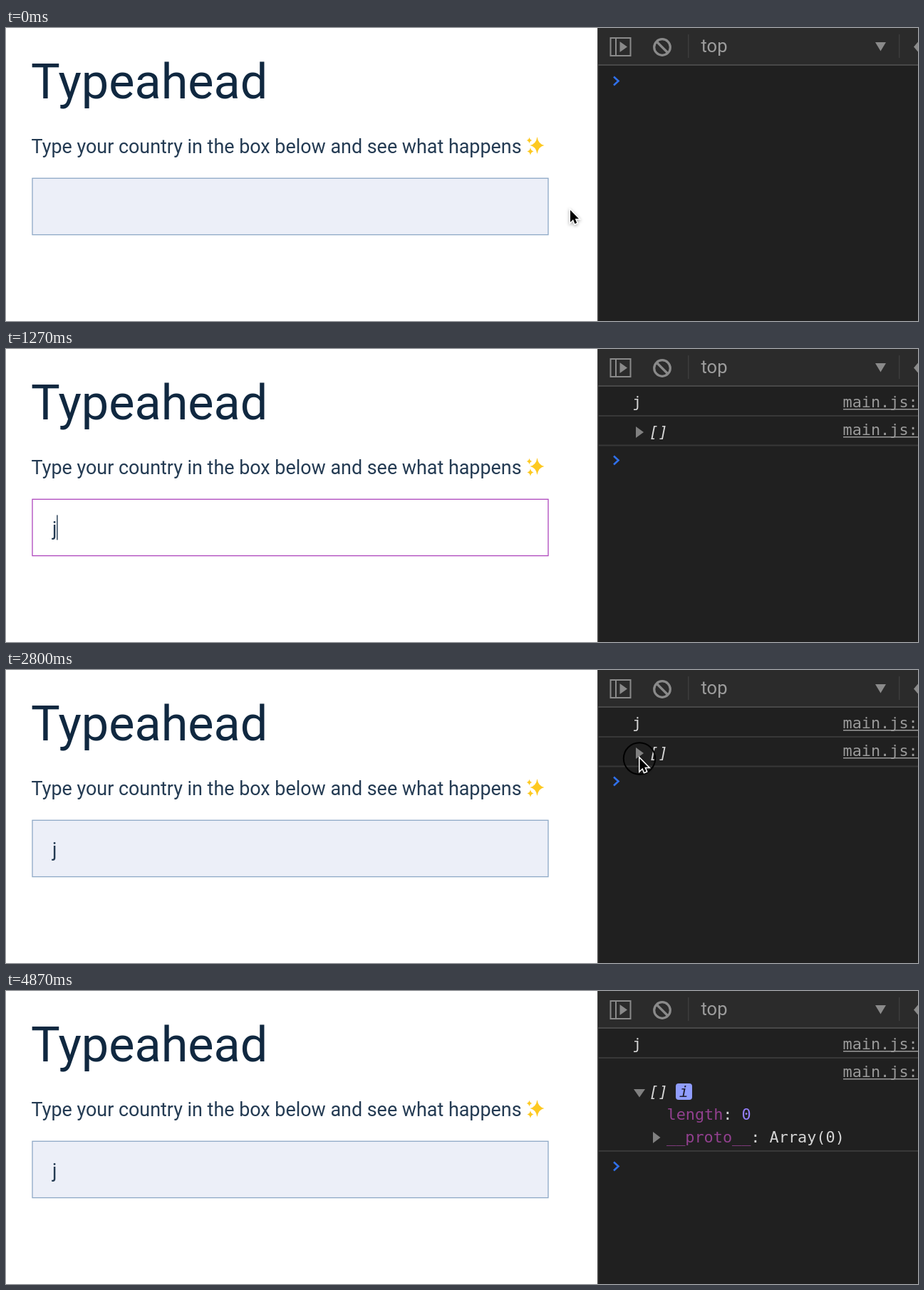
An HTML page with a canvas that plays this animation: 1280 by 412 pixels, repeating every 5070 ms.

```html
<!DOCTYPE html>
<html lang="en">
<head>
<meta charset="utf-8">
<title>Typeahead</title>
<style>
  html, body { margin: 0; width: 100%; height: 100%; overflow: hidden; background: #fff; }
  canvas { display: block; width: 1280px; height: 412px; }
</style>
</head>
<body>
<canvas id="stage" width="1280" height="412"></canvas>
<script>
const ctx = document.getElementById('stage').getContext('2d');
const LOOP = 5070;
const SANS = 'Roboto, sans-serif';
const MONO = '21.85px "DejaVu Sans Mono", monospace';
const INK = '#243b53', GREY = '#8a8a8a', PALE = '#d5d5d5', PURPLE = '#92408f';

const FOCUS = 670, TYPED = 1200, LOGGED = 1270, BLUR = 2800, EXPANDED = 2870;
const CARET_ON = [[FOCUS, 1730], [2270, 2730]];
const RING_ON = [[FOCUS, 730], [BLUR, 2930]];

// Pointer poses, each held until the next: time, shape, x, y
const POINTER = [
  [0, 'arrow', 792, 256],
  [270, 'arrow', 786, 255],
  [330, 'beam', 745, 252],
  [400, 'beam', 719, 251],
  [470, 'beam', 713, 251],
  [TYPED, 'none'],
  [2200, 'beam', 718, 249],
  [2270, 'beam', 742, 235],
  [2330, 'arrow', 802, 196],
  [2400, 'arrow', 868, 152],
  [2470, 'arrow', 905, 130],
  [2530, 'arrow', 912, 124],
  [2600, 'arrow', 897, 124],
  [2670, 'arrow', 889.5, 124.5],
  [4270, 'arrow', 864, 122],
  [4330, 'arrow', 960, 120],
  [4400, 'arrow', 1087, 127],
  [4470, 'arrow', 1185, 136],
  [4530, 'arrow', 1242, 149],
  [4600, 'arrow', 1270, 164],
  [4670, 'none']
];

const within = (t, spans) => spans.some(([from, to]) => t >= from && t < to);

function rect(x, y, w, h, color) {
  ctx.fillStyle = color;
  ctx.fillRect(x, y, w, h);
}

function text(str, x, y, font, color) {
  ctx.font = font;
  ctx.fillStyle = color;
  ctx.fillText(str, x, y);
}

function trace(points, closed) {
  ctx.beginPath();
  points.forEach(([x, y]) => ctx.lineTo(x, y));
  if (closed) ctx.closePath();
}

function polygon(points, color) {
  trace(points, true);
  ctx.fillStyle = color;
  ctx.fill();
}

function line(points, color, width) {
  trace(points, false);
  ctx.strokeStyle = color;
  ctx.lineWidth = width;
  ctx.stroke();
}

function circle(x, y, r, color, width) {
  ctx.beginPath();
  ctx.arc(x, y, r, 0, Math.PI * 2);
  ctx.strokeStyle = color;
  ctx.lineWidth = width;
  ctx.stroke();
}

function sparkle(x, y, rx, ry) {
  ctx.beginPath();
  ctx.moveTo(x, y - ry);
  [[rx, 0], [0, ry], [-rx, 0], [0, -ry]].forEach(([dx, dy], i) => {
    const sx = i < 2 ? 1 : -1, sy = i === 1 || i === 2 ? 1 : -1;
    ctx.quadraticCurveTo(x + sx * rx * 0.15, y + sy * ry * 0.15, x + dx, y + dy);
  });
  ctx.fillStyle = '#fdc921';
  ctx.fill();
}

function drawPage(t) {
  rect(0, 0, 830, 412, '#fff');
  text('Typeahead', 35, 99, '68.4px ' + SANS, '#102840');
  text('Type your country in the box below and see what happens', 35.6, 176, '26.9px ' + SANS, INK);
  sparkle(745.5, 165, 10, 12);
  sparkle(734.5, 158, 4, 4.5);
  sparkle(736, 173.5, 4.5, 5.5);

  const focused = t >= FOCUS && t < BLUR;
  rect(37, 211, 724, 80, focused ? '#fff' : '#eceff8');
  ctx.strokeStyle = focused ? '#ae47bd' : '#8ea8c6';
  ctx.lineWidth = 1.3;
  ctx.strokeRect(37, 211.3, 724, 79.4);

  if (t >= TYPED) text('j', 65, 262, '26.9px ' + SANS, INK);
  if (within(t, CARET_ON)) rect(t < TYPED ? 64.4 : 71.2, 233.5, 1.4, 35, INK);
}

function drawToolbar() {
  rect(831, 0, 449, 52, '#2b2b2b');
  rect(831, 51, 449, 2, '#484848');
  ctx.strokeStyle = GREY;
  ctx.lineWidth = 2;
  ctx.strokeRect(848.5, 14, 28, 25);
  line([[856, 14], [856, 39]], GREY, 2);
  polygon([[861.5, 19], [872, 26.5], [861.5, 34]], GREY);
  circle(921, 27, 11.3, GREY, 3.2);
  line([[913, 19], [929, 35]], GREY, 3.2);
  rect(957, 9, 1.5, 33, '#3d3d3d');
  text('top', 975.5, 34, '25.5px ' + SANS, '#9c9c9c');
  polygon([[1220, 20], [1235, 20], [1227.5, 32.5]], GREY);
  rect(1253, 9, 1.5, 33, '#3d3d3d');
  polygon([[1274, 26.5], [1280, 19.5], [1280, 33.5]], GREY);
}

function link(y) {
  text('main.js:', 1174.5, y, MONO, '#9a9a9a');
  rect(1175, y + 2, 105, 1.5, '#9a9a9a');
}

function drawArrayDetails() {
  polygon([[881, 138], [897, 138], [889, 149.5]], '#808080');
  text('[]', 902.5, 149, 'italic ' + MONO, PALE);
  ctx.beginPath();
  ctx.roundRect(940, 130, 23, 23, 4);
  ctx.fillStyle = '#909dff';
  ctx.fill();
  text('i', 944.8, 149, 'italic ' + MONO, '#202030');
  text('length', 927.5, 181, MONO, PURPLE);
  text(':', 1006.3, 181, MONO, PALE);
  text('0', 1032.6, 181, MONO, '#9580ff');
  polygon([[908, 198], [918.5, 206], [908, 214]], '#808080');
  text('__proto__', 927, 213, MONO, PURPLE);
  text(': Array(0)', 1045.3, 213, MONO, PALE);
}

function drawConsole(t) {
  rect(830, 0, 450, 412, '#202020');
  rect(830, 0, 1.5, 412, '#444');
  drawToolbar();

  let promptY = 74.5;
  if (t >= LOGGED) {
    const expanded = t >= EXPANDED;
    text('j', 879, 82, MONO, PALE);
    link(82);
    link(121);
    rect(831, 93, 449, 2, '#383838');
    rect(831, expanded ? 224 : 134.5, 449, 2, '#383838');
    if (expanded) {
      drawArrayDetails();
    } else {
      polygon([[884, 109], [895, 117], [884, 125]], '#808080');
      text('[]', 902.5, 124, 'italic ' + MONO, PALE);
    }
    promptY = expanded ? 246.5 : 156.5;
  }
  line([[853, promptY - 6], [859.5, promptY], [853, promptY + 6]], '#3070ea', 2.6);
}

function drawArrow() {
  const shape = [[0, 0], [0, 17], [4, 13.2], [6.4, 19.3], [9.2, 18.1], [6.7, 12.2], [12, 12.2]];
  ctx.save();
  ctx.shadowColor = 'rgba(0,0,0,.35)';
  ctx.shadowBlur = 4;
  ctx.shadowOffsetY = 1.5;
  trace(shape, true);
  ctx.strokeStyle = '#fff';
  ctx.lineWidth = 3;
  ctx.stroke();
  ctx.restore();
  polygon(shape, '#000');
}

function drawBeam() {
  const strokeBeam = (color, width) => {
    ctx.beginPath();
    for (const s of [-1, 1]) {
      ctx.moveTo(-4.5, s * 10.5);
      ctx.quadraticCurveTo(0, s * 10.5, 0, s * 7.5);
      ctx.quadraticCurveTo(0, s * 10.5, 4.5, s * 10.5);
    }
    ctx.moveTo(0, -8);
    ctx.lineTo(0, 8);
    ctx.moveTo(-2.5, 1.5);
    ctx.lineTo(2.5, 1.5);
    ctx.strokeStyle = color;
    ctx.lineWidth = width;
    ctx.stroke();
  };
  strokeBeam('#fff', 3.4);
  strokeBeam('#000', 1.5);
}

function drawPointer(t) {
  const [, shape, x, y] = POINTER.filter(pose => pose[0] <= t).pop();
  if (shape === 'none') return;
  if (within(t, RING_ON)) circle(x - 0.5, y, 22.2, '#000', 2);
  ctx.save();
  ctx.translate(x, y);
  if (shape === 'arrow') drawArrow();
  else drawBeam();
  ctx.restore();
}

function render(now) {
  const t = now % LOOP;
  drawPage(t);
  drawConsole(t);
  drawPointer(t);
}

let start;
function frame(now) {
  start ??= now;
  render(now - start);
  requestAnimationFrame(frame);
}
render(0);
requestAnimationFrame(frame);
</script>
</body>
</html>
```
